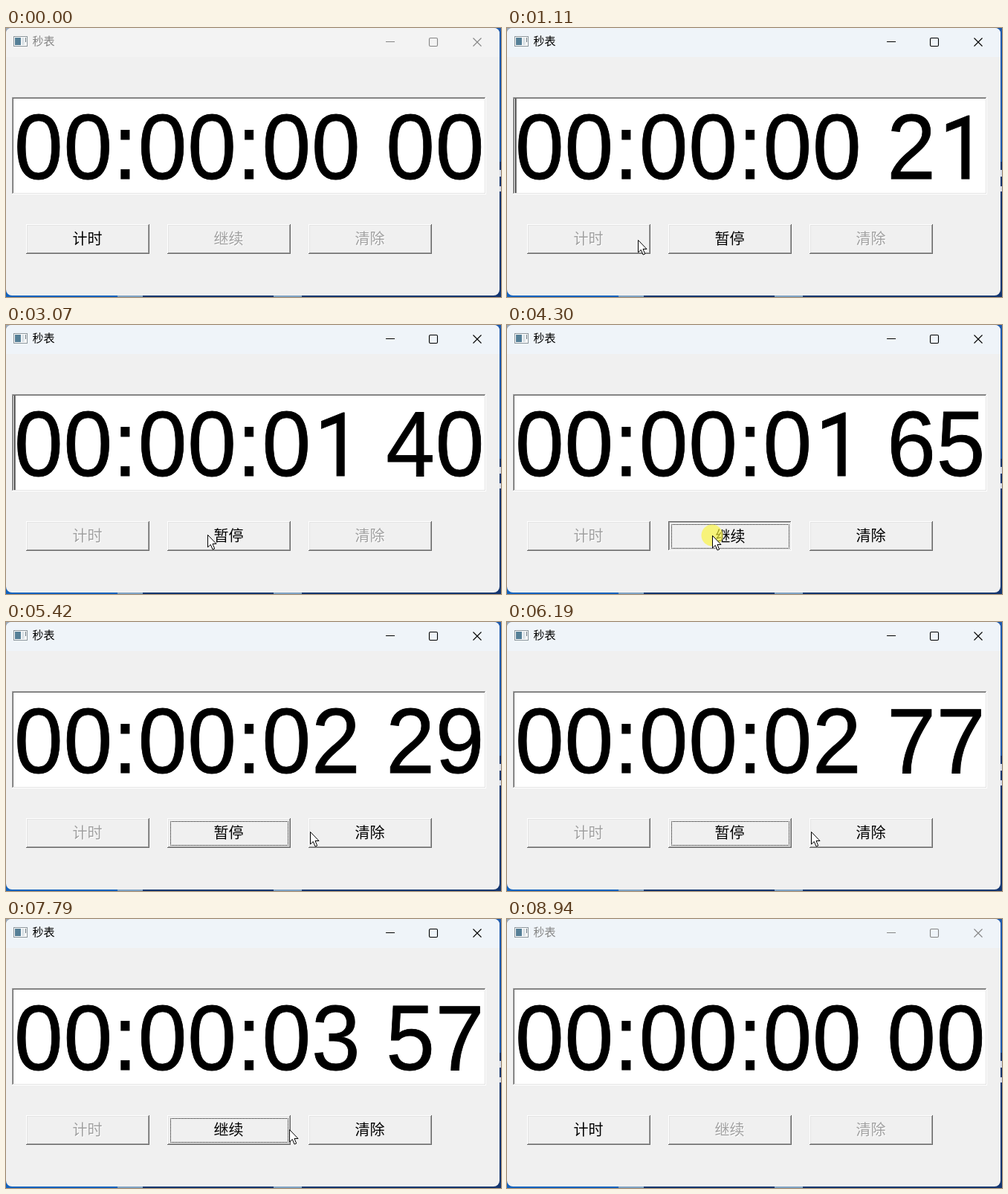
These frames come from a looping animation (666x362 px, 9.01 s). An HTML page:

```html
<!DOCTYPE html>
<html lang="zh-CN">
<head>
<meta charset="utf-8">
<title>秒表</title>
<style>
  html, body { margin: 0; width: 100%; height: 100%; overflow: hidden; background: #f0f0f0; }
  svg { display: block; width: 666px; height: 362px; }
  text { font-family: "Noto Sans CJK SC", "Noto Sans CJK", sans-serif; }
  .digits {
    font: 118px "Liberation Sans", Arial, sans-serif;
    letter-spacing: .9px; stroke: #000; stroke-width: .8px;
  }
  /* A numeral one without a foot. */
  .one { font: 113px Roboto, sans-serif; letter-spacing: -1.1px; }
  .label { font-size: 20px; text-anchor: middle; }
</style>
</head>
<body>
<svg id="stage" viewBox="0 0 666 362"></svg>
<script>
const LOOP = 9010;
const stage = document.getElementById('stage');

// Times at which the 70 ms screen refresh restarts.
const refreshes = [130, 3960, 4300, 7930, 8400, 8880, 8940];

// Press and release times of each click.
const START = [620, 760], PAUSE = [3350, 3490], RESUME = [4300, 4370],
      PAUSE_AGAIN = [7350, 7490], CLEAR = [8000, 8070];
const clicks = [START, PAUSE, RESUME, PAUSE_AGAIN, CLEAR];
const DEACTIVATE = 8880;

// Pointer stops: time, x, y.
const pointerPath = [
  [200, 250, 358], [600, 167, 285], [1000, 167, 285], [1600, 271, 282],
  [3890, 271, 282], [4100, 276, 283], [4500, 276, 283], [5140, 409, 282],
  [6600, 409, 282], [6960, 398, 281], [7280, 300, 283], [7520, 300, 283],
  [7900, 440, 283], [8330, 440, 283], [8600, 600, 364]
];

const within = (t, from, to) => t >= from && t < to;

function refreshTime(t) {
  const anchor = refreshes.filter(r => r <= t).pop();
  return anchor === undefined ? 0 : anchor + Math.floor((t - anchor) / 70) * 70;
}

function pointerAt(t) {
  const i = pointerPath.findIndex(p => p[0] > t);
  if (i < 1) return null;
  const [t0, x0, y0] = pointerPath[i - 1], [t1, x1, y1] = pointerPath[i];
  const k = (t - t0) / (t1 - t0), ease = k * k * (3 - 2 * k);
  return [Math.round(x0 + (x1 - x0) * ease), Math.round(y0 + (y1 - y0) * ease)];
}

function ticksAt(t) {
  if (t < START[1] || t >= CLEAR[1]) return 0;
  if (t < RESUME[1]) return Math.min(165, Math.max(0, Math.round(72 + (t - 1950) * 0.0607)));
  return Math.max(165, Math.round(229 + (Math.min(t, PAUSE_AGAIN[1]) - 5420) * 0.0617));
}

function clockText(ticks) {
  const pad = n => String(n).padStart(2, '0');
  return `00:00:${pad(Math.floor(ticks / 100))} ${pad(ticks % 100)}`;
}

const rect = (x, y, w, h, fill, extra = '') =>
  `<rect x="${x}" y="${y}" width="${w}" height="${h}" fill="${fill}" ${extra}/>`;

// Two-pixel border; colours go outer then inner.
function bevel(x, y, w, h, topLeft, bottomRight, fill) {
  const ring = i => {
    const l = x + i, t = y + i, rw = w - 2 * i, rh = h - 2 * i;
    return rect(l, t, rw, rh, bottomRight[i]) + rect(l, t, rw - 1, rh - 1, topLeft[i]);
  };
  return ring(0) + ring(1) + rect(x + 2, y + 2, w - 4, h - 4, fill);
}

function button(x, label, enabled, pressed, focused) {
  const light = ['#fff', '#e3e3e3'], dark = ['#696969', '#a0a0a0'];
  const shift = pressed ? 1 : 0;
  const write = (d, color) =>
    `<text class="label" x="${x + 82.5 + d}" y="${291 + d}" fill="${color}">${label}</text>`;
  let out = bevel(x, 264, 166, 40, pressed ? dark : light, pressed ? light : dark, '#f0f0f0');
  out += enabled ? write(shift, '#000') : write(1, '#fff') + write(0, '#a0a0a0');
  if (focused) {
    out += `<rect x="${x + 4.5}" y="268.5" width="158" height="32" fill="none"
      stroke="#000" stroke-dasharray="1 1" stroke-dashoffset=".5"/>`;
  }
  return out;
}

function desktop() {
  return rect(0, 0, 666, 362, '#14376f') + rect(0, 0, 12, 12, '#9aa9bb') +
    rect(0, 350, 150, 12, '#1262bd') +
    rect(150, 360, 34, 2, '#7fa3c4') + rect(360, 360, 38, 2, '#7fa3c4') +
    rect(655, 0, 11, 180, '#1d59ad') + rect(655, 180, 11, 182, '#13356f') +
    rect(664, 191, 2, 9, '#d5dbe8') + rect(664, 213, 2, 7, '#d5dbe8');
}

function titleBar(barColor, ink) {
  return `<path d="M0 39V8Q0 0 8 0H656Q664 0 664 8V39Z" fill="${barColor}"/>` +
    rect(10.5, 11.5, 18, 13, '#fff', 'stroke="#8b959b"') +
    rect(12, 13, 8, 10, '#557f96') + rect(21, 13, 4, 10, '#dce3e7') +
    rect(26, 13, 1, 6, '#61717b') +
    `<text x="35.5" y="23" font-size="15" fill="${ink}">秒表</text>
    <g fill="none" stroke="${ink}" stroke-width="1.1">
      <path d="M511 18.5H523M628.5 13.5L639.5 24.5M639.5 13.5L628.5 24.5"/>
      <rect x="569.5" y="13.5" width="11" height="11" rx="1.5"/>
    </g>`;
}

function display(text, caret) {
  const glyphs = text.replace(/1/g, '<tspan class="one" dx="4.1">1</tspan>');
  return bevel(8, 93, 638, 131, ['#a0a0a0', '#696969'], ['#fff', '#e3e3e3'], '#fff') +
    (caret ? rect(11, 95, 1.5, 127, '#222') : '') +
    `<text class="digits" transform="translate(11 203.3) scale(1 1.05)">${glyphs}</text>`;
}

function pointer([x, y], highlighted) {
  return (highlighted ? `<circle cx="${x}" cy="${y}" r="14.5" fill="#fbf53a" opacity=".65"/>` : '') +
    `<path transform="translate(${x + 0.5} ${y + 0.5})" fill="#fff" stroke="#000"
      d="M0 0V16.5L3.8 13L6.6 19.6L9.2 18.5L6.5 12H11.5Z"/>`;
}

function render(t) {
  const active = within(t, START[0], DEACTIVATE);
  const running = within(t, START[1], PAUSE[1]) || within(t, RESUME[1], PAUSE_AGAIN[1]);
  const idle = t < START[1] || t >= CLEAR[1];
  const pressed = click => within(t, ...click);
  const caret = within(t, START[1], PAUSE[0]) || within(t, CLEAR[1], 8600);
  const position = pointerAt(t);

  stage.innerHTML = desktop() +
    rect(0, 0, 664, 360, '#f0f0f0', 'rx="8"') +
    titleBar(t < START[0] ? '#f3f3f3' : '#eff4f9', active ? '#000' : '#858585') +
    display(clockText(ticksAt(t)), caret) +
    button(27, '计时', idle, pressed(START), pressed(START)) +
    button(217, running ? '暂停' : '继续', !idle,
      [PAUSE, RESUME, PAUSE_AGAIN].some(pressed), within(t, PAUSE[0], CLEAR[0])) +
    button(407, '清除', within(t, PAUSE[1], CLEAR[1]), pressed(CLEAR), pressed(CLEAR)) +
    (position ? pointer(position, clicks.some(([down, up]) => within(t, down, up + 70))) : '');
}

let shown = -1;
function tick() {
  const t = refreshTime(performance.now() % LOOP);
  if (t !== shown) render(shown = t);
  requestAnimationFrame(tick);
}
tick();
</script>
</body>
</html>
```
